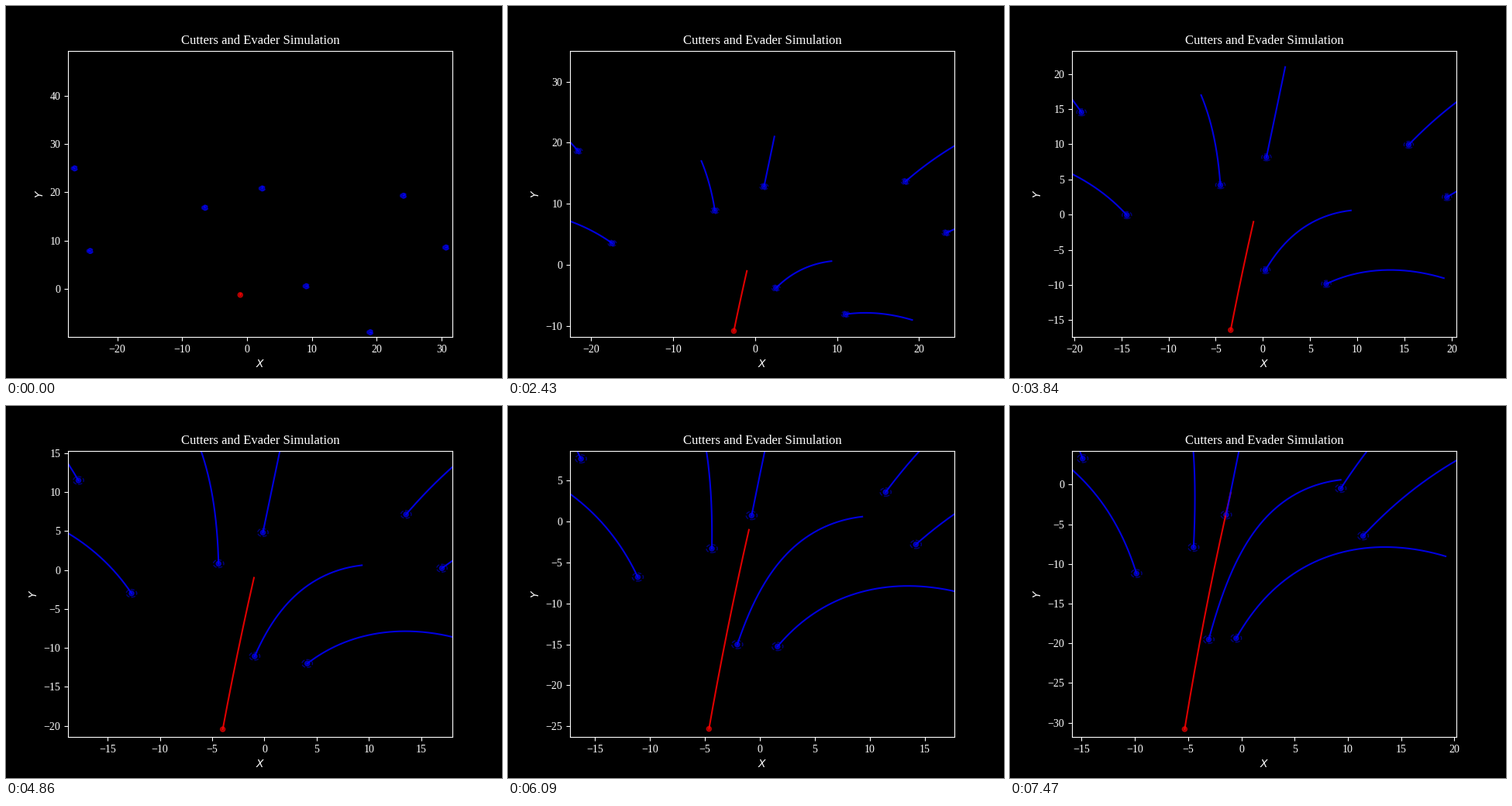
A matplotlib script for the animation above (7500 ms loop, 640 by 480 pixels).

```python
import numpy as np
import matplotlib.pyplot as plt
from matplotlib.animation import FuncAnimation
from matplotlib.patches import Circle

FRAMES, INTERVAL = 250, 30
LEAD = 2                      # steps already taken when the loop opens
CUTTER_SPEED, EVADER_SPEED = 0.10, 0.12
CAPTURE_RADIUS = 0.5
STARTS = [(-26.75, 25.1), (-24.4, 7.93), (-6.55, 17.0), (2.36, 21.0),
          (24.27, 19.43), (30.86, 8.64), (9.32, 0.6), (19.17, -9.03)]


def simulate(steps):
    """Cutters always head straight for the evader, which bends slowly south."""
    evader = np.empty((steps, 2))
    cutters = np.empty((steps, len(STARTS), 2))
    evader[0], cutters[0] = (-1, -1), STARTS
    for i in range(1, steps):
        angle = 0.168 - 0.00019 * i
        heading = np.array([-np.sin(angle), -np.cos(angle)])
        gap = evader[i - 1] - cutters[i - 1]
        unit = gap / np.linalg.norm(gap, axis=1, keepdims=True)
        evader[i] = evader[i - 1] + EVADER_SPEED * heading
        cutters[i] = cutters[i - 1] + CUTTER_SPEED * unit
    return evader, cutters


evader, cutters = simulate(FRAMES + LEAD)
paths = np.concatenate([evader[:, None], cutters], axis=1)
colors = ["red"] + ["blue"] * len(STARTS)

plt.style.use("dark_background")
plt.rcParams["font.family"] = "Liberation Serif"
plt.rcParams["mathtext.fontset"] = "dejavusans"

fig, ax = plt.subplots(figsize=(6.4, 4.8), dpi=100)
ax.set_title("Cutters and Evader Simulation")
ax.set_xlabel("$X$")
ax.set_ylabel("$Y$")

trails = [ax.plot([], [], color=c, lw=1.5, alpha=0.88)[0] for c in colors]
dots = ax.scatter(*paths[0].T, s=20, c=colors, alpha=0.6)
rings = [ax.add_patch(Circle(p, CAPTURE_RADIUS, fill=False, ec="blue",
                             ls="--", lw=1, alpha=0.5))
         for p in cutters[0]]


def update(frame):
    now = frame + LEAD
    points = paths[now]
    dots.set_offsets(points)
    for k, trail in enumerate(trails):
        trail.set_data(*paths[:now + 1, k].T)
    for ring, center in zip(rings, cutters[now]):
        ring.center = center

    # square data window anchored at the lower left agent
    low = points.min(axis=0) - 1
    span = (points.max(axis=0) + 1 - low).max()
    ax.set_xlim(low[0], low[0] + span)
    ax.set_ylim(low[1], low[1] + span)
    return [*trails, dots, *rings]


anim = FuncAnimation(fig, update, frames=FRAMES, interval=INTERVAL,
                     repeat=True, repeat_delay=0)
plt.show()
```
